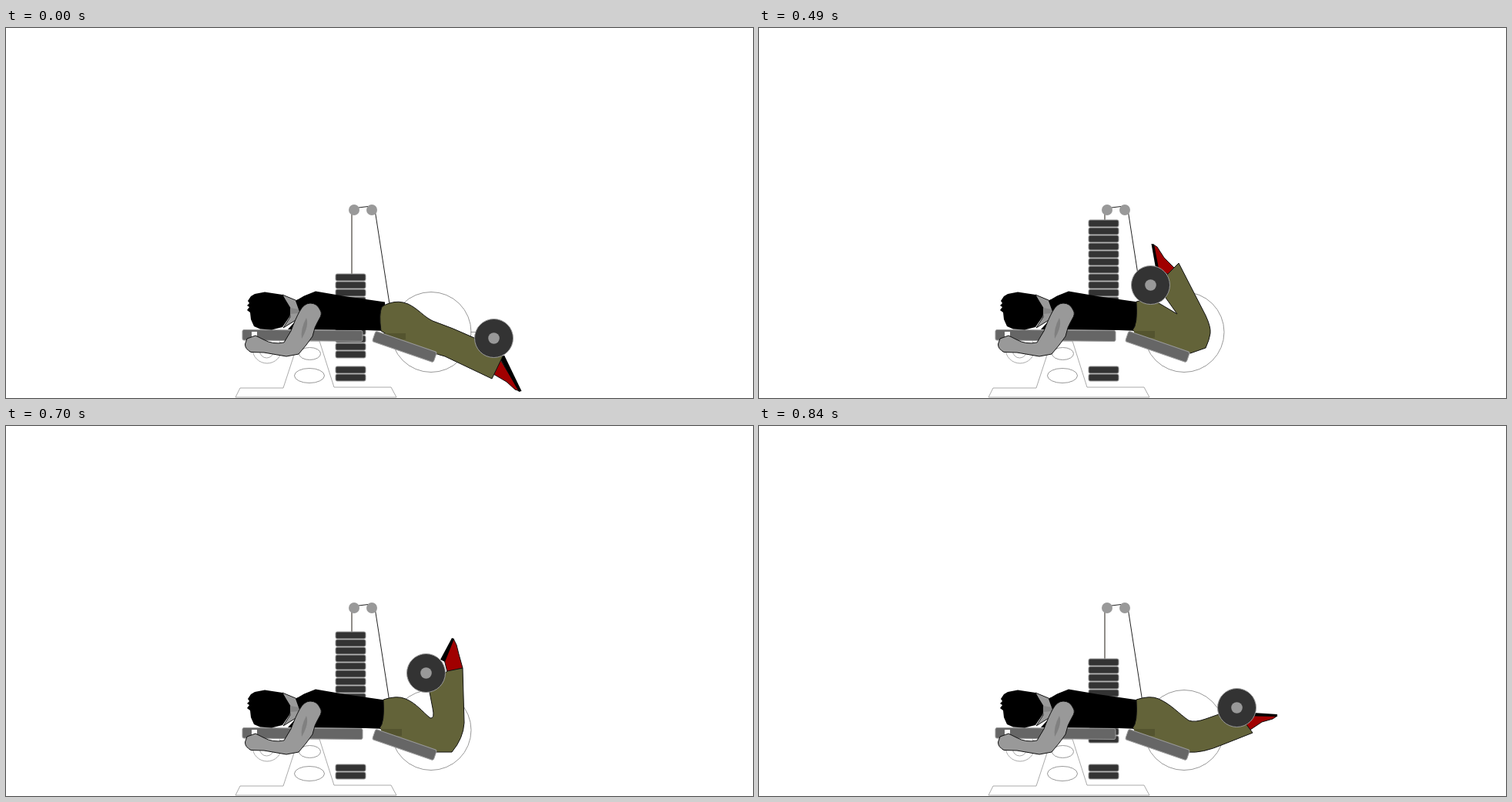
Recreate the animation shown at these times as an HTML page. Size 970 px wide and 480 px high, loop 1260 ms.

```html
<!DOCTYPE html>
<html lang="en">
<head>
<meta charset="utf-8">
<title>Lying leg curl</title>
<style>
  html, body { margin: 0; width: 100%; height: 100%; overflow: hidden; background: #fff; }
  svg { display: block; width: 970px; height: 480px; }

  .line { fill: none; stroke: #aaa; }
  .ring { fill: none; stroke: #999; }
  .cable { fill: none; stroke: #222; }
  .pad { fill: #666; stroke: #999; }
  .plate { fill: #333; stroke: #999; }
  .skin { fill: #999; stroke: #111; }
  .pants { fill: #636339; stroke: #111; }
  .shoe { fill: #a00000; stroke: #111; }
  .shade { fill: #54542f; }
  .grey { fill: #999; }

  /* One loop: quick lift, short squeeze, slower return */
  .stack, .pose { animation: 1260ms step-end infinite; }
  .pose { visibility: hidden; }
  .stack { animation-name: lift; }
  .straight { animation-name: straight; }
  .low { animation-name: low; }
  .half { animation-name: half; }
  .high { animation-name: high; }
  .full { animation-name: full; }

  @keyframes lift {
    0% { transform: none; }
    33.333% { transform: translateY(-35px); }
    38.889% { transform: translateY(-70px); }
    55.556% { transform: translateY(-52px); }
    61.111% { transform: translateY(-35px); }
    66.667%, 100% { transform: translateY(-17px); }
  }
  @keyframes straight {
    0% { visibility: visible; }
    33.333%, 100% { visibility: hidden; }
  }
  @keyframes half {
    0% { visibility: hidden; }
    33.333% { visibility: visible; }
    38.889% { visibility: hidden; }
    61.111% { visibility: visible; }
    66.667%, 100% { visibility: hidden; }
  }
  @keyframes full {
    0% { visibility: hidden; }
    38.889% { visibility: visible; }
    55.556%, 100% { visibility: hidden; }
  }
  @keyframes high {
    0% { visibility: hidden; }
    55.556% { visibility: visible; }
    61.111%, 100% { visibility: hidden; }
  }
  @keyframes low {
    0% { visibility: hidden; }
    66.667%, 100% { visibility: visible; }
  }
</style>
</head>
<body>
<svg viewBox="0 0 970 480">
  <defs>
    <rect id="plate" class="plate" x="428" width="39" height="9" rx="2"/>
    <g id="roller">
      <circle class="plate" r="25"/>
      <circle class="grey" r="7.3"/>
    </g>
    <clipPath id="shaft"><rect x="440" y="236" width="20" height="140"/></clipPath>
  </defs>

  <!-- Machine frame -->
  <path class="line" d="M298 479L304 467H360L380 406H407L426 466H500L507 479Z"/>
  <ellipse class="ring" cx="394.500" cy="422.500" rx="14" ry="8"/>
  <ellipse class="ring" cx="394" cy="451" rx="19.500" ry="9.500"/>
  <circle class="line" cx="339" cy="416" r="19"/>
  <circle class="line" cx="338.500" cy="419" r="9"/>
  <circle class="ring" cx="552" cy="394.500" r="52"/>

  <!-- Cable and weights -->
  <path class="cable" d="M458 233L470 231.500M479.500 239L498 358"/>
  <g clip-path="url(#shaft)">
    <path class="stack" d="M449 160V319" fill="none" stroke="#55504a" stroke-width="1.300"/>
  </g>
  <circle class="grey" cx="452" cy="236" r="7"/>
  <circle class="grey" cx="475" cy="236" r="7"/>
  <g id="fixed"></g>
  <g class="stack" id="stack"></g>

  <!-- Bench -->
  <path class="pad" d="M309 391.500L461 392.500Q463 392.500 463 394.500V404.500Q463 406.500 461 406.500L309 405Q307 405 307 403V393.500Q307 391.500 309 391.500Z"/>
  <path fill="#fff" d="M319 394H326V405H319Z"/>

  <!-- Upper body -->
  <path class="skin" d="M359 346L377 353.500L386 350L381 376L360 389L369 375L368 366Z"/>
  <path d="M376 354L387 347.500L402 341.500L440 348L492 355.500V393L467 392L366 391L376 380L381 368Z"/>
  <path d="M359 346L370 364L368 375L359 388L345 391.500L330 390.500L322 387L318 378L317 369L313 366L316 362L313 360L316 357L314 354L318 348L323 345L336 342.500Z"/>
  <path fill="#858585" d="M369 363L380 365V370L369 371Z"/>
  <path class="skin" d="M395 357Q404 357 408 366Q411 371 407 377Q400 388 398 400L390 411L380 423L364 426L335 421L318 420.500Q310 416 310.500 410L313 403L324 399L334 404Q346 411 361 408L370 393Q376 377 381 368Q387 357 395 357Z"/>
  <path fill="#808080" d="M390 376Q394 386 384 403Q382 391 390 376Z"/>

  <!-- Leg poses -->
  <g class="pose straight">
    <path class="ring" d="M603 394.500H616"/>
    <path class="shoe" d="M641 429L667 471L661 469L650 459L633 449Z"/>
    <path d="M641 428L647 424.500L669.500 471L666 472Z"/>
    <path class="pants" d="M498 357Q510 353 522 358C535 364 543 375 554 380Q580 389 608 402L645 426L631 455L570 426Q553 421 520 412L487 393Q484 371 488 362Q491 359 498 357Z"/>
    <path class="shade" d="M488 396H519V404H488Z"/>
    <use href="#roller" x="633.500" y="402.500"/>
  </g>

  <g class="pose low">
    <path class="shoe" d="M640 376H673L667 380L653 384L638 394L630 388Z"/>
    <path d="M642 372L673 374V377L642 376Z"/>
    <path class="pants" d="M490 355Q508 349 519 354C535 361 545 373 558 382Q566 385 580 380L600 373L632 386L641 398L603 413Q575 425 557 423L520 412L485 392Q492 385 490 355Z"/>
    <path class="shade" d="M487 393H514V402H487Z"/>
    <use href="#roller" x="620.500" y="365.500"/>
  </g>

  <g class="pose half">
    <path class="shoe" d="M605 328L643 309L640 317L630 327L621 341L612 344L603 339Z"/>
    <path d="M606 324L643 307.500V311L607 328Z"/>
    <path class="pants" d="M490 355Q508 349 519 354C535 361 545 373 558 382Q563 385 571 373L586 346L603 338L629 350L593 417L577 430L557 424L520 412L485 392Q492 385 490 355Z"/>
    <path class="shade" d="M487 393H514V402H487Z"/>
    <use href="#roller" x="583.500" y="324.500"/>
  </g>

  <g class="pose high">
    <path class="shoe" d="M569 303L581 276L585 284L588 296L593 314L573 319Z"/>
    <path d="M564 303L579 275L582 276L570 306Z"/>
    <path class="pants" d="M490 355Q508 349 519 354C533 360 540 370 551 379Q557 380 554 366L549 340L573 318L593 314L595 385Q594 405 579 423L557 423L520 412L485 392Q492 385 490 355Z"/>
    <path class="shade" d="M487 393H514V402H487Z"/>
    <use href="#roller" x="545.500" y="320.500"/>
  </g>

  <g class="pose full">
    <path class="shoe" d="M512 281L517 284L526 298L539 311L532 320L518 312Z"/>
    <path d="M509.500 280L513 280.500L519 312L515 311Z"/>
    <path class="pants" d="M490 355Q508 349 521 358L543 371L526 347L530 320L545 305L580 373Q587 388 586 396Q585 404 580 415L560 422L520 412L485 392Q492 385 490 355Z"/>
    <path class="shade" d="M487 393H514V402H487Z"/>
    <use href="#roller" x="508.500" y="333.500"/>
  </g>

  <rect class="pad" x="-42" y="-7" width="84" height="14" rx="2.500" transform="translate(517.500 413.500) rotate(19)"/>
</svg>
<script>
  const addPlates = (id, top, count) => {
    const group = document.getElementById(id);
    for (let i = 0; i < count; i++) {
      const plate = document.createElementNS(group.namespaceURI, 'use');
      plate.setAttribute('href', '#plate');
      plate.setAttribute('y', top + i * 10);
      group.append(plate);
    }
  };
  addPlates('stack', 319, 11);
  addPlates('fixed', 439, 2);
</script>
</body>
</html>
```
